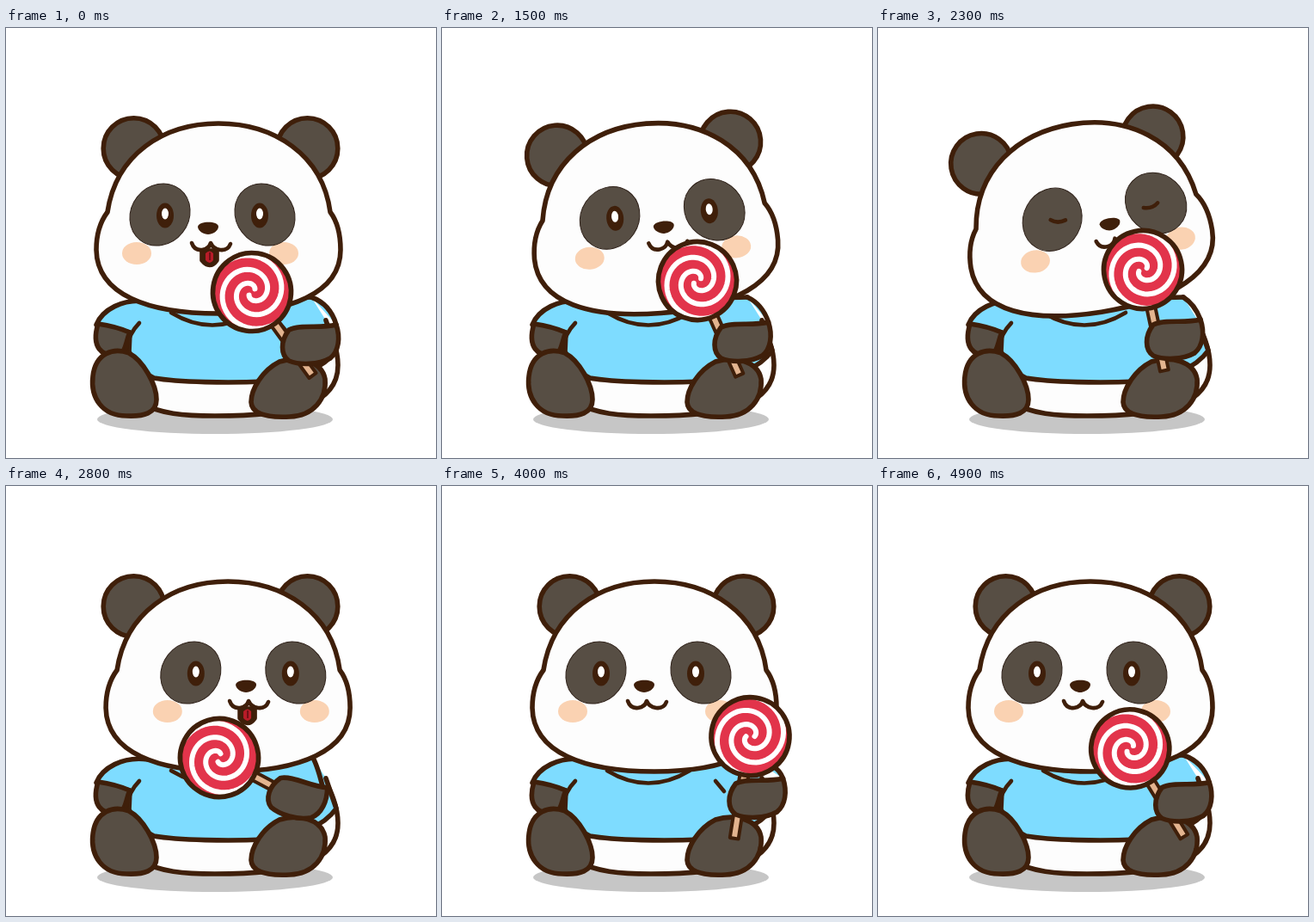
An HTML page that plays this animation: 500 by 500 pixels, repeating every 5 s.

```html
<!DOCTYPE html>
<html lang="en">
<head>
<meta charset="utf-8">
<title>Panda with a lollipop</title>
<style>
html, body { margin: 0; width: 100%; height: 100%; overflow: hidden; background: #fff; }
svg { display: block; width: 100%; height: 100%; }
.o { stroke: #3f1f0a; stroke-width: 5.6; stroke-linecap: round; stroke-linejoin: round; }
.line { fill: none; stroke-width: 4.6; }
.fur { fill: #574e44; }
.white { fill: #fdfdfd; }
.shirt { fill: #7edcff; }
.ink { fill: #3f1f0a; }
.cheek { fill: #fad2b2; }
</style>
</head>
<body>
<svg viewBox="0 0 500 500">
  <clipPath id="disc"><circle r="46"/></clipPath>
  <ellipse cx="243" cy="455" rx="137" ry="17" fill="#c6c6c6"/>

  <g class="o">
    <path class="white" d="M130 370C130 440 170 451 243 451C330 451 386 440 386 392C386 370 375 350 370 340Z"/>
    <path class="shirt" d="M372 340L384 375C370 395 340 408 300 411C260 413 200 412 172 407C158 400 148 390 143 376L144 354L105 345C112 328 135 314 165 318L355 313"/>
    <path class="line" d="M192 331Q240 360 288 331M318 343L328 355"/>
    <path class="fur" d="M107 344Q128 347 144 354C139 365 140 375 132 381C110 383 99 370 107 344Z"/>
    <path class="line" d="M155 343Q143 355 139 375"/>
    <path class="fur" d="M101 405C104 378 125 371 143 378C160 387 175 415 175 432C175 448 160 452 140 451C112 451 98 430 101 405Z"/>
    <path class="fur" d="M371 408C367 387 340 381 318 388C298 398 285 420 285 435C286 451 310 453 330 452C357 451 373 432 371 408Z"/>
    <path id="sleeve" class="shirt"/>
  </g>

  <g id="head">
    <circle id="ear" class="o fur" cx="148.500" cy="140" r="35.300"/>
    <use href="#ear" transform="matrix(-1 0 0 1 499 0)"/>
    <path id="skull" class="o white" d="M247 111C183 111 128 147 118 214C109 226 105 241 105 258C106 310 165 332 247 332C330 332 389 308 389 258C389 240 386 226 377 214C368 147 311 111 247 111Z"/>
    <g id="face">
      <ellipse class="cheek" cx="152" cy="262" rx="17" ry="13"/>
      <ellipse class="cheek" cx="323" cy="262" rx="17" ry="13"/>
      <g id="eye">
        <ellipse class="fur" stroke="#2e2018" rx="33.500" ry="37.500" transform="translate(179 217) rotate(38)"/>
        <g id="open">
          <ellipse class="ink" cx="185" cy="218" rx="10" ry="14.500"/>
          <ellipse fill="#fff" cx="185" cy="216" rx="4" ry="6.500"/>
        </g>
        <path id="shut" class="o line" d="M177 217Q184 223 194 220"/>
      </g>
      <use href="#eye" transform="matrix(-1 0 0 1 480 0)"/>
    </g>
    <g id="muzzle">
      <path class="ink" d="M223 231C224 224 247 224 247 231C247 236 240 240 235 240C230 240 223 236 223 231Z"/>
      <g id="tongue">
        <path class="o ink" d="M228 259H245V270Q237 281 228 270Z"/>
        <path fill="#b81c28" d="M232 262Q237 257 241 262V270Q237 276 232 270Z"/>
        <path stroke="#5a0d12" stroke-width="1.500" d="M237 261V270"/>
      </g>
      <path class="o line" d="M216 250Q219 259 228 258Q236 257 238 250Q241 257 249 258Q258 259 261 251"/>
    </g>
  </g>

  <g id="stick"><rect class="o" x="-5" y="20" width="10" height="100" fill="#e3b48f" style="stroke-width:4"/></g>
  <path id="hand" class="o fur" d="M-24 -17C-10 -24 12 -18 31 -23C36 -8 34 8 24 16C10 24 -12 24 -24 19C-34 12 -34 -4 -24 -17Z"/>
  <g id="candy">
    <circle r="46" fill="#e2344b"/>
    <path id="swirl" fill="none" stroke="#fff" stroke-width="6" stroke-linecap="round" clip-path="url(#disc)"/>
    <circle class="o" r="45.500" fill="none"/>
  </g>
</svg>
<script>
const LOOP = 5000, STEP = 100;
const $ = id => document.getElementById(id);

// Candy centre, stick angle, hand centre, hand angle
const rest = [286, 307, 36, 353, 368, 0];
const bite = [308, 281, 12, 344, 362, 0];
const lick = [248, 316, 62, 337, 363, 18];
const away = [373, 288, -18, 368, 362, 0];

const linear = (t, a, b) => Math.min(1, Math.max(0, (t - a) / (b - a)));
const smooth = (t, a, b) => {
  const u = linear(t, a, b);
  return u * u * (3 - 2 * u);
};
const mix = (from, to, u) => from.map((v, i) => v + (to[i] - v) * u);

function pose(t) {
  let p = mix(rest, bite, smooth(t, 1200, 1800));
  p = mix(p, lick, smooth(t, 2400, 2800));
  p = mix(p, away, smooth(t, 3000, 3800));
  return mix(p, rest, linear(t, 3800, 5000));
}

function spiral(start) {
  let d = "";
  for (let u = 0; u <= 1; u += 1 / 64) {
    const r = 50 - 45 * u, a = start + u * Math.PI * 2.7;
    d += (d ? "L" : "M") + r * Math.cos(a) + " " + r * Math.sin(a);
  }
  return d;
}
$("swirl").setAttribute("d", spiral(3.9) + spiral(3.9 + Math.PI));

const move = (id, x, y = 0, angle = 0) =>
  $(id).setAttribute("transform", `translate(${x} ${y}) rotate(${angle})`);
const show = (id, on) => { $(id).style.display = on ? "" : "none"; };
const within = (t, from, to) => t >= from && t < to;

function draw(now) {
  const t = Math.floor(now % LOOP / STEP) * STEP;
  const [x, y, angle, hx, hy, bend] = pose(t);
  const tilt = 9 * (smooth(t, 1200, 1800) - smooth(t, 2400, 2800));
  const turn = 41 * (smooth(t, 1100, 1800) - smooth(t, 2600, 3500));

  $("head").setAttribute("transform", `rotate(${-tilt} 248 330)`);
  move("skull", turn * .31);
  move("face", turn);
  move("muzzle", turn * 1.23);
  move("stick", x, y, -angle);
  move("candy", x, y, -angle);
  move("hand", hx, hy, bend);
  $("sleeve").setAttribute("d", `M355 313Q${hx + 24} 321 ${hx + 31} ${hy - 23 + bend / 2}`);

  const asleep = within(t, 600, 1100) || within(t, 2000, 2500);
  show("open", !asleep);
  show("shut", asleep);
  show("tongue", t < 400 || within(t, 2600, 3100));
}

const begin = performance.now();
function tick() {
  draw(performance.now() - begin);
  requestAnimationFrame(tick);
}
tick();
</script>
</body>
</html>
```
